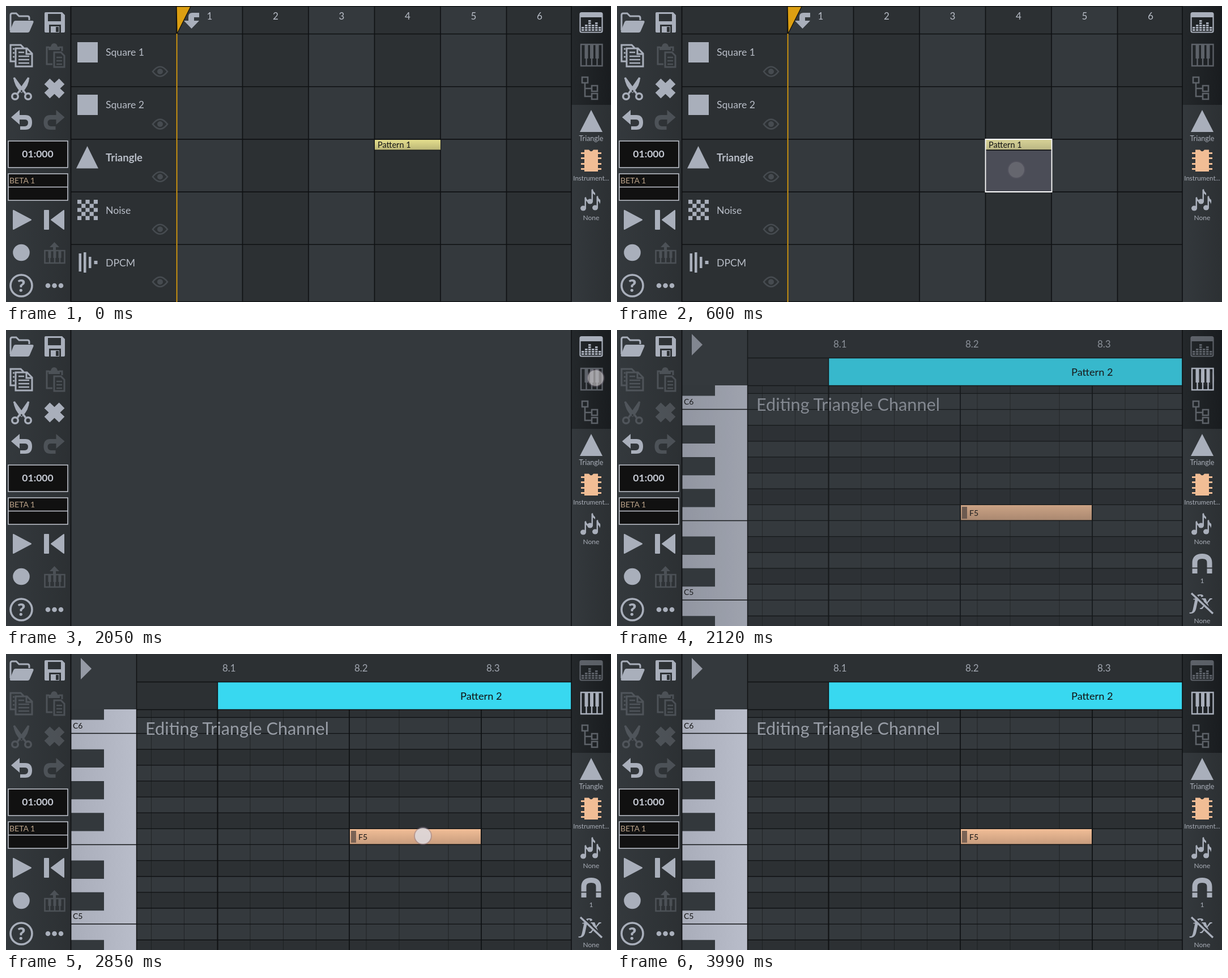
An HTML page for the animation above (4.19 s loop, 1068x524 px).

```html
<!DOCTYPE html>
<html lang="en">
<head>
<meta charset="utf-8">
<title>Pattern editor</title>
<style>
html, body { margin: 0; width: 100%; height: 100%; overflow: hidden; background: #34393d; }
svg { display: block; width: 1068px; height: 524px; font-family: Lato, "Open Sans", sans-serif; }
.icon { fill: #a9afbb; }
.line { fill: none; stroke: #a9afbb; }
.dim { opacity: .25; }
.half { opacity: .45; }
.mid { text-anchor: middle; }
.label { fill: #b9bec8; font-size: 17.6px; }
.small { fill: #a9aeb8; font-size: 12px; text-anchor: middle; }
.black { fill: none; stroke: #0f1113; }

.song, .editor, .veil, .before, .after, .edits, .seq, .keys, .selected, .frame, .touch {
  animation: 4190ms step-end infinite;
}
.song { animation-name: song; }
.editor, .after { animation-name: editor; }
.veil { animation-name: veil; }
.edits { animation-name: edits; }
.seq { animation-name: seq; }
.keys { animation-name: keys; }
.selected { animation-name: selected; }
.frame { animation-name: frame; }
.t1 { animation-name: tap1; }
.t2 { animation-name: tap2; }
.t3 { animation-name: tap3; }

@keyframes song { 0% { visibility: visible } 48.926%, 100% { visibility: hidden } }
@keyframes editor { 0% { visibility: hidden } 50.597%, 100% { visibility: visible } }
@keyframes veil { 0% { opacity: 0 } 50.597% { opacity: .2 } 52.267%, 100% { opacity: 0 } }
@keyframes edits { 0% { opacity: 1 } 50.597%, 100% { opacity: .25 } }
@keyframes seq { 0% { opacity: 1 } 50.597%, 100% { opacity: .45 } }
@keyframes keys { 0% { opacity: .45 } 50.597%, 100% { opacity: 1 } }
@keyframes selected { 0% { opacity: 0 } 14.32%, 100% { opacity: 1 } }
@keyframes frame {
  0% { stroke: #fff } 25.298% { stroke: #e6e7ea } 27.685% { stroke: #ccced4 } 30.072%, 100% { stroke: #b6b9c2 }
}
@keyframes tap1 { 0% { opacity: 0 } 9.546% { opacity: .85 } 14.32% { opacity: .2 } 17.422%, 100% { opacity: 0 } }
@keyframes tap2 { 0% { opacity: 0 } 48.926% { opacity: .65 } 50.597% { opacity: .06 } 52.267%, 100% { opacity: 0 } }
@keyframes tap3 {
  0% { opacity: 0 }
  68.019% { opacity: 1 } 69.69% { opacity: .75 } 71.36% { opacity: .45 } 73.03% { opacity: .2 } 74.702% { opacity: 0 }
  87.351% { opacity: 1 } 89.976% { opacity: .6 } 92.601% { opacity: .25 } 95.227%, 100% { opacity: 0 }
}
</style>
</head>
<body>
<svg viewBox="0 0 1068 524">
  <defs>
    <linearGradient id="bar"><stop stop-color="#34393d"/><stop offset="1" stop-color="#2c3033"/></linearGradient>
    <linearGradient id="tabs"><stop stop-color="#24282b"/><stop offset="1" stop-color="#191c1f"/></linearGradient>
    <linearGradient id="ivory"><stop stop-color="#a9adba"/><stop offset="1" stop-color="#b9bdca"/></linearGradient>
    <linearGradient id="yellow" x2="0" y2="1"><stop stop-color="#e4de8d"/><stop offset="1" stop-color="#bab576"/></linearGradient>
    <linearGradient id="khaki" x2="0" y2="1"><stop stop-color="#d6d196"/><stop offset="1" stop-color="#b9b583"/></linearGradient>
    <linearGradient id="peach" x2="0" y2="1"><stop stop-color="#f2be97"/><stop offset="1" stop-color="#c79c7d"/></linearGradient>
    <path id="turn" d="M9 197L24 184V193H34Q46 193 46 206Q46 219 34 219H25V213H33Q39 213 39 206.500Q39 201 33 201H24V210Z"/>
    <g id="eye" fill="none" stroke="#464b50" stroke-width="2.6">
      <path d="M-13 0Q0-17 13 0Q0 17-13 0Z"/><circle r="5" fill="#464b50" stroke="none"/>
    </g>
    <g id="finger">
      <circle r="16" fill="#8c7d90" opacity=".45"/><circle r="14" fill="#e6e2e4" opacity=".8"/>
    </g>
  </defs>
  <rect width="1068" height="524" fill="#34393d"/>

  <g class="song">
    <g id="columns"></g>
    <rect x="115" width="186" height="524" fill="#2c3033"/>
    <g id="songLines" class="black" stroke-width="1.6"></g>
    <g class="icon">
      <path d="M126 64h36v36h-36zM126 157h36v36h-36zM143.500 248l19.500 39.500h-39z"/>
      <path id="checks"/>
      <path d="M128.500 438h4.500v32h-4.500zM137 436h4.500v36h-4.500zM146 444h4.500v20h-4.500zM155.500 451h6v6h-6z"/>
    </g>
    <g class="label">
      <text x="176" y="88">Square 1</text>
      <text x="176" y="181">Square 2</text>
      <text x="176" y="274.500" font-weight="700" font-size="18.500">Triangle</text>
      <text x="176" y="367.500">Noise</text>
      <text x="176" y="460.500">DPCM</text>
    </g>
    <g id="eyes"></g>
    <path d="M651 237H767V255H651Z" fill="url(#yellow)"/>
    <path class="black" d="M651 255H767"/>
    <g class="selected">
      <path d="M651 237H767V255H651Z" fill="url(#khaki)"/>
      <path d="M651 256H767V328H651Z" fill="#4b4d57"/>
      <path class="black" d="M651 255H767" stroke-width="1.500"/>
      <path class="frame" d="M650.500 236H767.500V329H650.500Z" fill="none" stroke="#fff" stroke-width="1.800"/>
    </g>
    <text x="656" y="250.500" font-size="14.500" fill="#151515">Pattern 1</text>
    <path d="M301.500 49V524" stroke="#dfa114" stroke-width="1.800"/>
    <path d="M301 1H326L302 49Z" fill="#dc9f12" stroke="#15120a" stroke-width="1.200"/>
    <path class="icon" d="M341 12H329Q322 12 322 19V26H314L327.500 40L341 26H332V20H341Z"/>
  </g>

  <g class="editor">
    <path d="M231 0H998V524H231Z" fill="#34393d"/>
    <g id="rows"></g>
    <path d="M231 0H998V98H231Z" fill="#2c3033"/>
    <path d="M374 50H998V98H374Z" fill="#38d8f0"/>
    <path d="M115 98H230V524H115Z" fill="url(#ivory)"/>
    <path id="blackKeys" fill="#33383c"/>
    <path d="M115 0H230V98H115Z" fill="#34393d"/>
    <path class="black" d="M115 140.500H231M115 337.500H231M115 478H231" stroke-width="1.500"/>
    <path class="black" d="M230.500 0V524M231 49.500H998M231 98.500H998M373.500 50V524" stroke-width="1.400"/>
    <path d="M132 7L151 26L132 45Z" fill="#959aa5"/>
    <g fill="#a1a6b0" font-size="17">
      <text x="382" y="31">8.1</text><text x="615" y="31">8.2</text><text x="848" y="31">8.3</text>
    </g>
    <text x="802" y="80.500" font-size="18.200" fill="#111">Pattern 2</text>
    <text x="246" y="143" font-size="30.700" fill="#979ca5">Editing Triangle Channel</text>
    <g fill="#151515" font-size="14">
      <text x="118" y="131.500">C6</text><text x="118" y="469">C5</text>
    </g>
    <path d="M606.500 309.500H838.500V337H606.500Z" fill="url(#peach)" stroke="#111"/>
    <path d="M609 313H618V334H609Z" fill="#7a6355"/>
    <text x="622" y="328.500" font-size="14" fill="#151515">F5</text>
  </g>
  <rect class="veil" x="115" width="883" height="524" fill="#34393d" opacity="0"/>

  <!-- left toolbar -->
  <rect width="114" height="524" fill="url(#bar)"/>
  <path class="black" d="M114.500 0V524" stroke-width="1.800"/>
  <path class="line" stroke-width="3" d="M8 43V16Q8 13 11 13H18L23 18H38Q41 18 41 21V25"/>
  <path class="icon" d="M17 26H46Q50 26 48 30L42 44Q41 47 38 47H9Q6 47 7 44L13 29Q14 26 17 26Z"/>
  <path class="icon" fill-rule="evenodd" d="M70 11H99L104 16V45Q104 47 102 47H70Q68 47 68 45V13Q68 11 70 11ZM74 14V27H97V14ZM76 33V47H79V36H94V47H97V33ZM88 37V46H93V37Z"/>
  <path class="icon" d="M79 36H88V47H79Z"/>
  <g class="edits">
    <path class="line" stroke-width="3" d="M16 98H8V69H26L31 74M17 75H37L46 84V107H17ZM36 75V85H46"/>
    <path class="line" stroke-width="2.500" d="M12 76H15M12 83H15M12 90H15M22 82H32M22 89H41M22 95H41M22 101H41"/>
    <path class="line" stroke-width="3.600" d="M20.500 155L40 127M34.500 155L14 127"/>
    <path class="icon" d="M13 126L31 148L27 154Q14 141 13 126ZM41 126L24 148L28 154Q41 141 41 126Z"/>
    <g class="line" stroke-width="3.500"><circle cx="16" cy="160" r="5.300"/><circle cx="39" cy="160" r="5.300"/></g>
    <path class="line" stroke-width="14" d="M72.500 133.500L98.500 158.500M98.500 133.500L72.500 158.500"/>
  </g>
  <g class="dim">
    <path class="line" stroke-width="3" d="M82 103H72V73H76M94 73H99V80M85 82H97L103 88V108H85Z"/>
    <path class="icon" d="M75 78V72H79Q80 66 85 66T91 72H95V78Z"/>
    <path class="line" stroke-width="2.400" d="M89 91H99M89 97H99M89 103H99"/>
    <use href="#turn" class="icon" transform="matrix(-1 0 0 1 112.500 0)"/>
    <path class="icon" d="M85.500 418L94 427H88V432H83V427H77Z"/>
    <path class="line" stroke-width="2.500" d="M68.500 433H103.500V455H68.500ZM77 445V455M86 445V455M95 445V455"/>
    <path class="icon" d="M74.500 433H79.500V446H74.500ZM83.500 433H88.500V446H83.500ZM92.500 433H97.500V446H92.500Z"/>
  </g>
  <use href="#turn" class="icon"/>
  <g fill="#111" stroke="#c3c7d1" stroke-width="1.500">
    <path d="M4 239H109V286H4ZM4 297H109V344H4ZM4 320.500H109"/>
  </g>
  <text class="mid" x="56" y="268" font-size="17.500" font-weight="700" fill="#c6cad4">01:000</text>
  <text x="6" y="313.500" font-size="14" fill="#bba389">BETA 1</text>
  <g class="icon" stroke="#a9afbb" stroke-width="2" stroke-linejoin="round">
    <path d="M13 362L44 378.500L13 395Z"/>
    <path d="M68 362H75V395H68ZM102 362V395L80 378.500Z"/>
  </g>
  <g class="icon">
    <circle cx="27" cy="436.500" r="14.800"/>
    <circle cx="74" cy="495" r="4.300"/><circle cx="85.500" cy="495" r="4.300"/><circle cx="97" cy="495" r="4.300"/>
    <text class="mid" x="27" y="506" font-size="31" font-weight="900">?</text>
  </g>
  <circle class="line" cx="27" cy="495" r="19" stroke-width="3.600"/>

  <!-- right bar -->
  <rect x="998" width="70" height="524" fill="url(#bar)"/>
  <rect x="998" width="70" height="175" fill="url(#tabs)"/>
  <path class="black" d="M998 0V524" stroke-width="1.600"/>
  <g class="seq">
    <rect class="line" x="1013.500" y="12" width="39" height="34.500" rx="2.500" stroke-width="2.200"/>
    <path class="icon" d="M1013 12H1053V20H1013Z"/>
    <path id="meters" class="line" stroke-width="5"/>
  </g>
  <g class="keys">
    <path class="line" stroke-width="2.400" d="M1015 68H1052.500V106H1015ZM1024.500 92V106M1034 92V106M1043.500 92V106"/>
    <path class="icon" d="M1021.500 68H1027.500V93H1021.500ZM1031 68H1037V93H1031ZM1040.500 68H1046.500V93H1040.500Z"/>
  </g>
  <path class="line half" stroke-width="2.600" d="M1017 126H1027V136H1017ZM1022 136V160H1034M1022 146H1034M1034 141H1044V151H1034ZM1034 155H1044V165H1034Z"/>
  <path class="icon" d="M1033 184L1053 223H1013Z"/>
  <path d="M1021 254.500H1029Q1033 260 1037 254.500H1045V293H1021Z" fill="#f1bd95"/>
  <path d="M1015 260.500H1051M1015 269.500H1051M1015 279.500H1051M1015 288.500H1051" stroke="#f1bd95" stroke-width="3.200"/>
  <g class="icon">
    <ellipse cx="1019" cy="358" rx="5" ry="4.500"/><ellipse cx="1031" cy="346" rx="5" ry="4.500"/><ellipse cx="1040" cy="357" rx="5" ry="4.500"/>
    <path d="M1021.500 358V339L1024 338Q1024 342 1028 344V348L1024 345V358ZM1033.500 346V325L1036 324Q1036 328 1040 331V335L1036 332V346ZM1042.500 357V337L1045 336Q1045 341 1049 343Q1050 347 1048 351Q1048 347 1045 345V357Z"/>
  </g>
  <g class="small">
    <text x="1033" y="239" font-size="12.500">Triangle</text>
    <text x="1033" y="308.500" style="font-size:11.500px">Instrument...</text>
    <text x="1033" y="379">None</text>
  </g>
  <g class="after">
    <path class="line" stroke-width="9" d="M1020 431V412Q1020 400.500 1033 400.500T1046 412V431"/>
    <path d="M1015 421.500H1025M1041 421.500H1051" stroke="#303438" stroke-width="2"/>
    <text class="icon mid" x="1033" y="494" font-family="Noto Serif, Liberation Serif, serif" font-style="italic" font-weight="700" font-size="35">fx</text>
    <path d="M1016 464L1054 500" stroke="#303438" stroke-width="3"/>
    <path class="line" stroke-width="3.400" d="M1014 466L1052 502"/>
    <text class="small" x="1033" y="448">1</text>
    <text class="small" x="1033" y="518.500">None</text>
  </g>

  <g class="touch t1" opacity="0"><use href="#finger" x="705" y="290"/></g>
  <g class="touch t2" opacity="0"><use href="#finger" x="1041" y="85"/></g>
  <g class="touch t3" opacity="0"><use href="#finger" x="736" y="322"/></g>
</svg>
<script>
const el = id => document.getElementById(id);
const range = n => [...Array(n).keys()];
const box = (x, y, w, h) => `M${x} ${y}h${w}v${h}h${-w}z`;
const path = (d, attrs) => `<path d="${d}" ${attrs}/>`;

// song grid
const colX = k => 301 + 116.5 * k;
const rowY = k => 49.5 + 93.2 * k;
el('columns').innerHTML = range(6).map(k =>
  path(box(colX(k), 0, 116.5, 524), `fill="${k % 2 ? '#2c3033' : '#34393d'}"`) +
  `<text class="label mid" x="${colX(k) + 58.5}" y="23.5" style="font-size:17px">${k + 1}</text>`).join('');
el('songLines').innerHTML = path(
  range(6).map(k => `M${colX(k)} 0V524`).join('') +
  range(5).map(k => `M115 ${rowY(k)}H998`).join('') + 'M115 .5H998M115 523.5H998', '');
el('eyes').innerHTML = range(5).map(k => `<use href="#eye" x="272" y="${116 + 93.1 * k}"/>`).join('');
el('checks').setAttribute('d', range(25).filter(i => i % 2 === 0)
  .map(i => box(126 + i % 5 * 7.2, 343 + Math.floor(i / 5) * 7.2, 7.2, 7.2)).join(''));

// piano roll, counted in semitones down from C#
const step = 28.13;
const noteY = k => 84.3 + step * k;
const sharps = [0, 3, 5, 7, 10, 12, 15];
const beats = [373.5, 606, 839];
const ticks = [256.5, 314.5, 431, 489.5, 547.5, 636, 694, 781, 897, 955];
const vertical = x => `M${x} 98V524`;
el('rows').innerHTML =
  path(sharps.map(k => box(231, noteY(k), 767, step)).join(''), 'fill="#2c3033"') +
  path(ticks.map(vertical).join(''), 'class="black" stroke-opacity=".5"') +
  path(range(16).map(k => `M231 ${noteY(k)}H998`).join(''), 'class="black" stroke-width="1.3"') +
  path(beats.map(vertical).join(''), 'class="black" stroke-width="1.7"');
el('blackKeys').setAttribute('d', sharps.map(k => box(115, noteY(k), 58, 32.3)).join(''));

// level meters in the sequencer icon
el('meters').setAttribute('d', [2, 3, 5, 3, 4, 2].map((n, i) =>
  range(n).map(j => `M${1016 + i * 6} ${42.5 - j * 4}h4.5`).join('')).join(''));
el('meters').setAttribute('stroke-width', 2.8);
</script>
</body>
</html>
```
